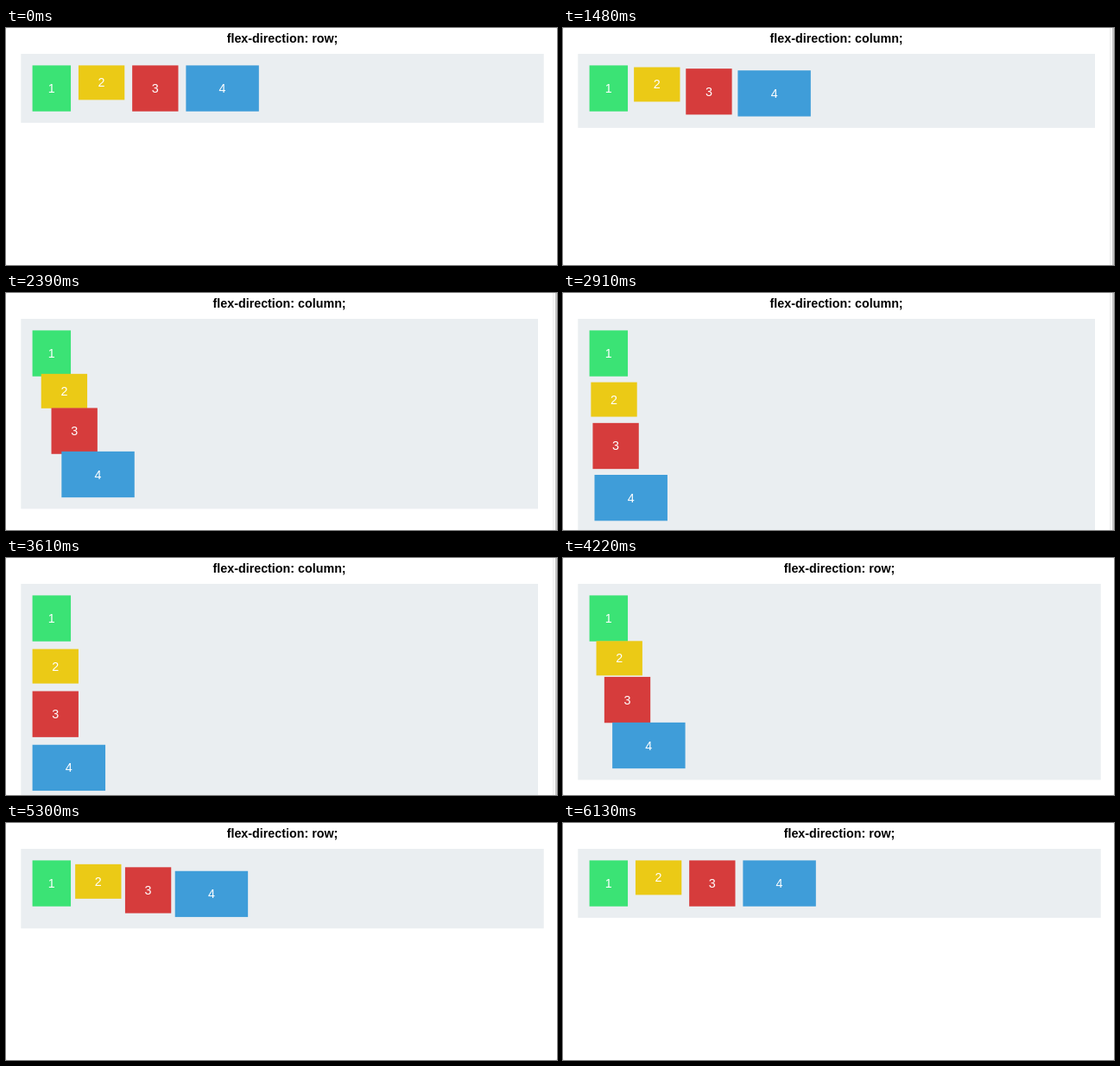
Write an HTML page that moves like this. It is 638 px wide and 275 px high and loops after 6.17 s.

```html
<!DOCTYPE html>
<html lang="en">
<head>
<meta charset="utf-8">
<title>flex-direction</title>
<style>
  html, body { margin: 0; width: 100%; height: 100%; overflow: hidden; background: #e6e6e6; }
  svg { display: block; width: 638px; height: 275px; }
  text { font: 14.3px "Liberation Sans", Arial, sans-serif; text-anchor: middle; fill: #fff; }
  #title { font-weight: bold; fill: #000; }
</style>
</head>
<body>
<svg viewBox="0 0 638 275">
  <rect width="638" height="275" rx="2" fill="#fff"/>
  <text id="title" y="17.4"></text>
  <rect id="panel" x="17.3" y="30" fill="#eaeef1"/>
  <g id="boxes"></g>
  <g id="scrollbar">
    <rect x="633" width="5" height="275" fill="#fafafa"/>
    <rect x="633" width="1" height="275" fill="#eeeeee"/>
    <rect x="636" width="2" height="275" fill="#c4c4c4"/>
  </g>
</svg>
<script>
const LOOP = 6170, DURATION = 1990, TO_COLUMN = 1380, TO_ROW = 3959;
const SCALE = 4 / 9, GAP = 20 * SCALE, X = 30.6, Y = 43.4;
const $ = id => document.getElementById(id);

function add(parent, tag, attrs) {
  const node = document.createElementNS("http://www.w3.org/2000/svg", tag);
  for (const key in attrs) node.setAttribute(key, attrs[key]);
  return parent.appendChild(node);
}

// Each box knows its offset along the row (dx) and down the column (dy).
let dx = 0, dy = 0;
const boxes = [
  [100, 120, "#3be375"],
  [120, 90, "#ebca16"],
  [120, 120, "#d63c3c"],
  [190, 120, "#3f9dd9"]
].map(([w, h, fill], i) => {
  const width = w * SCALE, height = h * SCALE;
  const node = add($("boxes"), "g", {});
  add(node, "rect", { width, height, fill });
  add(node, "text", { x: width / 2, y: height / 2 + 5 }).textContent = i + 1;
  const box = { node, dx, dy };
  dx += width + GAP;
  dy += height + GAP;
  return box;
});

// cubic-bezier(.25, .1, .25, 1)
function ease(t) {
  if (t <= 0) return 0;
  if (t >= 1) return 1;
  const bezier = (a, b, s) => 3 * a * s * (1 - s) ** 2 + 3 * b * s * s * (1 - s) + s ** 3;
  let low = 0, high = 1;
  for (let i = 0; i < 24; i++) {
    const mid = (low + high) / 2;
    if (bezier(0.25, 0.25, mid) < t) low = mid; else high = mid;
  }
  return bezier(0.1, 1, low);
}

function draw(time) {
  const column = time >= TO_COLUMN && time < TO_ROW;
  const p = ease((time - TO_COLUMN) / DURATION) - ease((time - TO_ROW) / DURATION);

  $("title").textContent = `flex-direction: ${column ? "column" : "row"};`;
  $("title").setAttribute("x", column ? 316.6 : 320);
  $("panel").setAttribute("width", column ? 598.7 : 605.4);
  $("panel").setAttribute("height", 80 + 390 * SCALE * p);
  $("scrollbar").style.display = column ? "" : "none";
  for (const { node, dx, dy } of boxes)
    node.setAttribute("transform", `translate(${X + dx * (1 - p)} ${Y + dy * p})`);
}

const start = performance.now();
(function frame() {
  draw((performance.now() - start) % LOOP);
  requestAnimationFrame(frame);
})();
</script>
</body>
</html>
```
